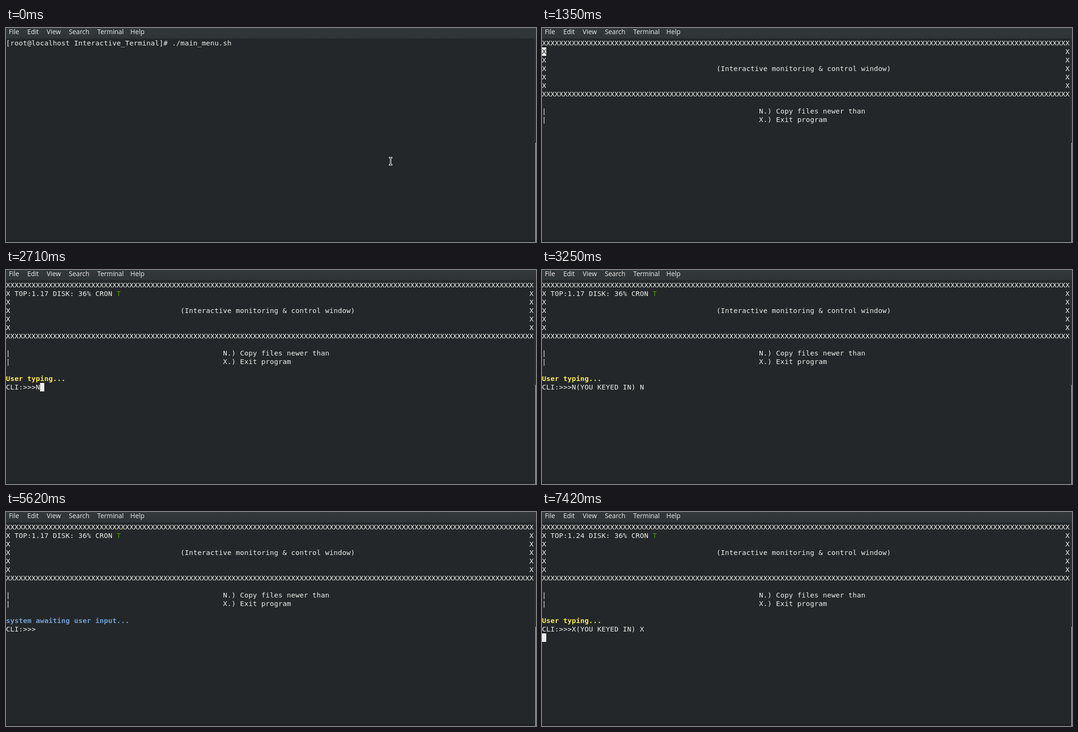
These frames come from a looping animation (1121 px wide and 453 px high, 8000 ms). An HTML page:

```html
<!DOCTYPE html>
<html lang="en">
<head>
<meta charset="utf-8">
<title>Terminal menu</title>
<style>
  :root { --bg: #232729; --fg: #eeeeec; }
  html, body { margin: 0; width: 100%; height: 100%; overflow: hidden; background: var(--bg); }
  #stage { position: relative; width: 1121px; height: 453px; overflow: hidden; background: var(--bg); color: var(--fg); }
  #stage > * { position: absolute; }

  #bar { left: 0; top: 0; width: 1121px; height: 22px; background: linear-gradient(#33393b, #2f3537); }
  #bar span { position: absolute; top: -2px; font: 13.8px/20px "Open Sans", "Noto Sans", sans-serif; }
  #track { left: 1117px; top: 22px; width: 4px; height: 431px; background: #2b2f31; }
  #thumb { left: 1120px; top: 243px; width: 1px; height: 210px; background: #e4e5e5; }
  #foot { left: 0; top: 448px; width: 1117px; height: 5px; background: #1f2325; }

  .text {
    left: calc(var(--col) * 9px);
    top: calc(23px + var(--row) * 18px);
    font: 14.667px/17px "DejaVu Sans Mono", monospace;
    letter-spacing: calc(9px - 1ch);
    white-space: pre;
  }
  .cursor { width: 9px; height: 18px; background: var(--fg); color: var(--bg); }
  .green { color: #4e9a06; }
  .yellow { color: #fce94f; font-weight: bold; }
  .blue { color: #729fcf; font-weight: bold; }
</style>
</head>
<body>
<div id="stage">
  <div id="bar">
    <span style="left:6px">File</span>
    <span style="left:45px">Edit</span>
    <span style="left:86px">View</span>
    <span style="left:133px">Search</span>
    <span style="left:193px">Terminal</span>
    <span style="left:263px">Help</span>
  </div>
  <div id="track"></div>
  <div id="thumb"></div>
  <div id="foot"></div>
  <svg id="pointer" style="left:810px;top:273px" width="8" height="18" viewBox="0 0 8 18" fill="none">
    <path d="M0 1.5H7M3.5 1V17M0 16.5H7" stroke="#fff" stroke-width="3"/>
    <path d="M1 1.5H6M3.5 1V17M1 16.5H6" stroke="#000"/>
  </svg>
</div>
<script>
  const LOOP = 8000;
  const MENU = 1350, PROMPT = 1370, STATUS = 2610, REFRESH = 5700;
  const stage = document.getElementById('stage');
  const parts = [];

  // Spans are flat lists of start and end times in ms.
  const show = (el, ...spans) => parts.push({ el, spans });

  function put(col, row, text, spans, className = '') {
    const el = document.createElement('div');
    el.className = 'text ' + className;
    el.style.setProperty('--col', col);
    el.style.setProperty('--row', row);
    el.textContent = text;
    stage.append(el);
    show(el, ...spans);
  }
  const cursor = (col, row, spans, text = '') => put(col, row, text, spans, 'cursor');

  show(document.getElementById('pointer'), 0, 1300);
  put(0, 0, '[root@localhost Interactive_Terminal]# ./main_menu.sh', [0, MENU]);

  const menu = [MENU, LOOP];
  for (const row of [0, 6]) put(0, row, 'X'.repeat(124), menu);
  for (let row = 1; row < 6; row++) {
    put(0, row, 'X', menu);
    put(123, row, 'X', menu);
  }
  put(41, 3, '(Interactive monitoring & control window)', menu);
  put(0, 8, '|', menu);
  put(0, 9, '|', menu);
  put(51, 8, 'N.) Copy files newer than', menu);
  put(51, 9, 'X.) Exit program', menu);

  put(2, 1, 'TOP:1.17', [STATUS, REFRESH]);
  put(2, 1, 'TOP:1.24', [REFRESH, LOOP]);
  put(11, 1, 'DISK: 36% CRON', [STATUS, LOOP]);
  put(26, 1, 'T', [STATUS, LOOP], 'green');

  put(0, 11, 'system awaiting user input...', [PROMPT, 2710, 4790, 6260], 'blue');
  put(0, 11, 'User typing...', [2710, 4790, 6260, LOOP], 'yellow');
  put(0, 12, 'CLI:>>>', [PROMPT, LOOP]);
  put(7, 12, 'N', [2710, 4790]);
  put(8, 12, '(YOU KEYED IN) N', [2810, 4790]);
  put(7, 12, 'X', [6260, LOOP]);
  put(8, 12, '(YOU KEYED IN) X', [6390, LOOP]);

  cursor(54, 0, [250, 840, 1320, MENU]);
  cursor(0, 1, [MENU, PROMPT], 'X');
  cursor(7, 12, [PROMPT, 1910, 2520, 2710, 5050, 5620, 5980, 6260]);
  cursor(8, 12, [2710, 2810, 6260, 6390]);
  cursor(0, 13, [2810, 3250, 3860, 4430, 6390, 6830, 7420, LOOP]);

  function draw(time) {
    const t = time % LOOP;
    for (const { el, spans } of parts) {
      // An odd count of passed times means the part is inside a span.
      const on = spans.filter(s => s <= t).length % 2;
      el.style.visibility = on ? 'visible' : 'hidden';
    }
  }

  let start;
  function tick(now) {
    start ??= now;
    draw(now - start);
    requestAnimationFrame(tick);
  }
  draw(0);
  requestAnimationFrame(tick);
</script>
</body>
</html>
```
